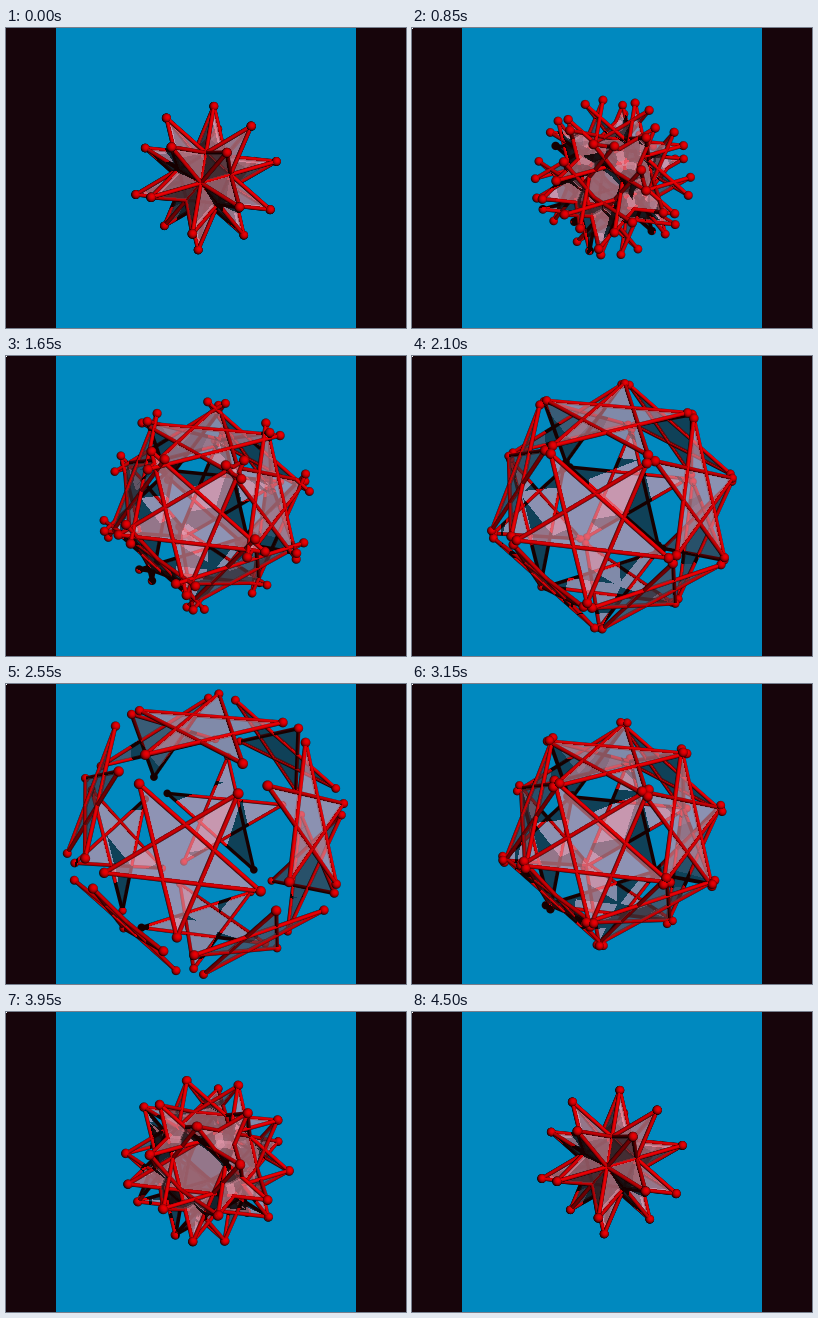
An HTML page with a canvas for the animation above (5000 ms loop, 400 by 300 pixels).

```html
<!DOCTYPE html>
<html lang="en">
<head>
<meta charset="utf-8">
<title>Twelve pentagrams</title>
<style>
  html, body { margin: 0; width: 100%; height: 100%; overflow: hidden; background: #17050b; }
  canvas { display: block; }
</style>
</head>
<body>
<canvas id="stage" width="400" height="300"></canvas>
<script>
const ctx = document.getElementById('stage').getContext('2d');
const startTime = performance.now();

const SIZE = 300, HALF = SIZE / 2;
const CAMERA = 10, FOCAL = 722;
const STEP_MS = 50, LOOP_MS = 5000, REST_STEPS = 10, PEAK = 40;
const REST_HEIGHT = 0.1876, TRAVEL = 1.5;
const RADIUS = 0.9822, INNER = RADIUS * Math.cos(Math.PI * 0.4);
const TUBE = 0.027, BALL = 0.061;
const SKY = [0, 137, 191], GLASS = [255, 165, 185], RED = [215, 0, 5];
const GLASS_ALPHA = 0.6, AMBIENT = 0.1;

const dot = (a, b) => a[0] * b[0] + a[1] * b[1] + a[2] * b[2];
const scale = (a, s) => a.map(c => c * s);
const add = (a, b) => a.map((c, i) => c + b[i]);
const sub = (a, b) => add(a, scale(b, -1));
const unit = a => scale(a, 1 / Math.hypot(...a));
const cross = (a, b) => [
  a[1] * b[2] - a[2] * b[1],
  a[2] * b[0] - a[0] * b[2],
  a[0] * b[1] - a[1] * b[0]
];
const turn = (u, v, angle) => add(scale(u, Math.cos(angle)), scale(v, Math.sin(angle)));
const FIFTH = Math.PI * 2 / 5;
const five = [0, 1, 2, 3, 4];

const LIGHT = unit([0.27, 0.23, 0.935]);

// Fivefold axes of an icosahedron in viewing position: x right, y up, z to the viewer.
const front = unit([-0.162, -0.159, 0.974]);
const up = unit([0.0793, 0.9817, 0.1733]);
const side = cross(front, up);
const ring = five.map(k =>
  add(scale(front, 1 / Math.sqrt(5)), scale(turn(up, side, k * FIFTH), 2 / Math.sqrt(5))));
const half = [front, ...ring];
const axes = [...half, ...half.map(a => scale(a, -1))];

const stars = axes.map(normal => {
  const near = axes.find(a => Math.abs(dot(a, normal) - 0.447) < 0.05);
  const e1 = unit(sub(near, scale(normal, dot(near, normal))));
  const e2 = cross(normal, e1);
  const arms = five.map(k => turn(e1, e2, (k + 0.5) * FIFTH));
  return { normal, arms, slope: dot(normal, LIGHT) };
});

function project(p) {
  const depth = CAMERA - p[2], s = FOCAL / depth;
  return { x: HALF + p[0] * s, y: HALF - p[1] * s, depth, s };
}

// Is a point of the star's plane inside the pentagram?
function inStar(star, height, x, y, z) {
  const r2 = x * x + y * y + z * z - height * height;
  if (r2 > RADIUS * RADIUS) return false;
  if (r2 < INNER * INNER) return true;
  let outside = 0;
  for (const a of star.arms) {
    if (a[0] * x + a[1] * y + a[2] * z > INNER && ++outside > 1) return false;
  }
  return true;
}

function inShadow(owner, height, x, y, z) {
  for (const star of stars) {
    if (star === owner) continue;
    const n = star.normal;
    const t = (height - n[0] * x - n[1] * y - n[2] * z) / star.slope;
    if (t > 0.07 && inStar(star, height, x + t * LIGHT[0], y + t * LIGHT[1], z + t * LIGHT[2])) return true;
  }
  return false;
}

// Visits the pixels of the box around some points.
function eachPixel(points, margin, visit) {
  const xs = points.map(p => p.x), ys = points.map(p => p.y);
  const low = v => Math.max(0, Math.floor(Math.min(...v) - margin));
  const high = v => Math.min(SIZE - 1, Math.ceil(Math.max(...v) + margin));
  const x0 = low(xs), x1 = high(xs), y0 = low(ys), y1 = high(ys);
  for (let j = y0; j <= y1; j++) {
    for (let i = x0; i <= x1; i++) visit(i + 0.5, j + 0.5, j * SIZE + i);
  }
}

function render(step) {
  const height = REST_HEIGHT + TRAVEL * step / PEAK;
  const layers = new Array(SIZE * SIZE);
  const put = (index, depth, alpha, color, lit, star) => {
    (layers[index] || (layers[index] = [])).push({ depth, alpha, color, lit, star });
  };

  function addFace(star, corners) {
    const n = star.normal, gap = height - n[2] * CAMERA;
    eachPixel(corners, 0, (x, y, index) => {
      const dx = (x - HALF) / FOCAL, dy = (HALF - y) / FOCAL;
      const facing = n[0] * dx + n[1] * dy - n[2];
      const depth = gap / facing;
      if (depth < 1 || !inStar(star, height, dx * depth, dy * depth, CAMERA - depth)) return;
      put(index, depth, GLASS_ALPHA, GLASS, facing < 0 ? star.slope : -star.slope, star);
    });
  }

  function addTube(star, p, q, a, b) {
    const axis = unit(sub(q, p));
    const view = unit(sub([0, 0, CAMERA], scale(add(p, q), 0.5)));
    const flank = unit(cross(axis, view)), face = cross(flank, axis);
    const flankLight = dot(flank, LIGHT), faceLight = dot(face, LIGHT);
    const ex = b.x - a.x, ey = b.y - a.y, length = Math.hypot(ex, ey);
    let nx = -ey / length, ny = ex / length;
    if (nx * flank[0] - ny * flank[1] < 0) { nx = -nx; ny = -ny; }
    eachPixel([a, b], 4, (x, y, index) => {
      const rx = x - a.x, ry = y - a.y;
      const u = (rx * ex + ry * ey) / (length * length);
      if (u < 0 || u > 1) return;
      const depth = 1 / ((1 - u) / a.depth + u / b.depth);
      const width = TUBE * FOCAL / depth, off = rx * nx + ry * ny;
      const cover = Math.min(1, width + 0.5 - Math.abs(off));
      if (cover <= 0) return;
      const k = Math.max(-1, Math.min(1, off / width)), bulge = Math.sqrt(1 - k * k);
      put(index, depth - TUBE * bulge, cover, RED, k * flankLight + bulge * faceLight, star);
    });
  }

  function addBall(star, c) {
    const r = BALL * c.s;
    eachPixel([c], r + 1, (x, y, index) => {
      const dx = (x - c.x) / r, dy = (c.y - y) / r, d = Math.hypot(dx, dy);
      const cover = Math.min(1, r + 0.5 - d * r);
      if (cover <= 0) return;
      const dz = Math.sqrt(Math.max(0, 1 - d * d));
      put(index, c.depth - BALL * dz, cover, RED, dot([dx, dy, dz], LIGHT), star);
    });
  }

  for (const star of stars) {
    const center = scale(star.normal, height);
    const tips = star.arms.map(a => add(center, scale(a, RADIUS)));
    const corners = tips.map(project);
    addFace(star, corners);
    for (const k of five) {
      const other = (k + 2) % 5;
      addTube(star, tips[k], tips[other], corners[k], corners[other]);
      addBall(star, corners[k]);
    }
  }

  const image = ctx.createImageData(SIZE, SIZE);
  for (let index = 0; index < layers.length; index++) {
    const dx = (index % SIZE + 0.5 - HALF) / FOCAL;
    const dy = (HALF - Math.floor(index / SIZE) - 0.5) / FOCAL;
    const stack = layers[index] || [];
    if (stack.length > 1) stack.sort((a, b) => a.depth - b.depth);
    let clear = 1, r = 0, g = 0, b = 0;
    for (const { depth, alpha, color, lit, star } of stack) {
      const dark = lit <= 0 || inShadow(star, height, dx * depth, dy * depth, CAMERA - depth);
      const light = clear * alpha * (dark ? AMBIENT : AMBIENT + lit);
      r += light * color[0];
      g += light * color[1];
      b += light * color[2];
      clear *= 1 - alpha;
      if (clear < 0.02) break;
    }
    image.data.set([r + clear * SKY[0], g + clear * SKY[1], b + clear * SKY[2], 255], index * 4);
  }
  return image;
}

const cache = [];
const picture = step => cache[step] || (cache[step] = render(step));

function draw(time) {
  const tick = Math.floor(time / STEP_MS);
  const moved = Math.max(0, Math.min(2 * PEAK, tick - REST_STEPS));
  const step = PEAK - Math.abs(PEAK - moved);
  ctx.fillStyle = '#17050b';
  ctx.fillRect(0, 0, 400, 300);
  ctx.putImageData(picture(step), 50, 0);
  if (tick > 0) {
    ctx.fillStyle = '#fff';
    ctx.fillRect(0, 0, 1, 1);
  }
  // Use the rest to prepare the coming pictures.
  if (moved === 0 && cache.length <= PEAK) picture(cache.length);
}

function loop() {
  draw((performance.now() - startTime) % LOOP_MS);
  requestAnimationFrame(loop);
}
loop();
</script>
</body>
</html>
```
